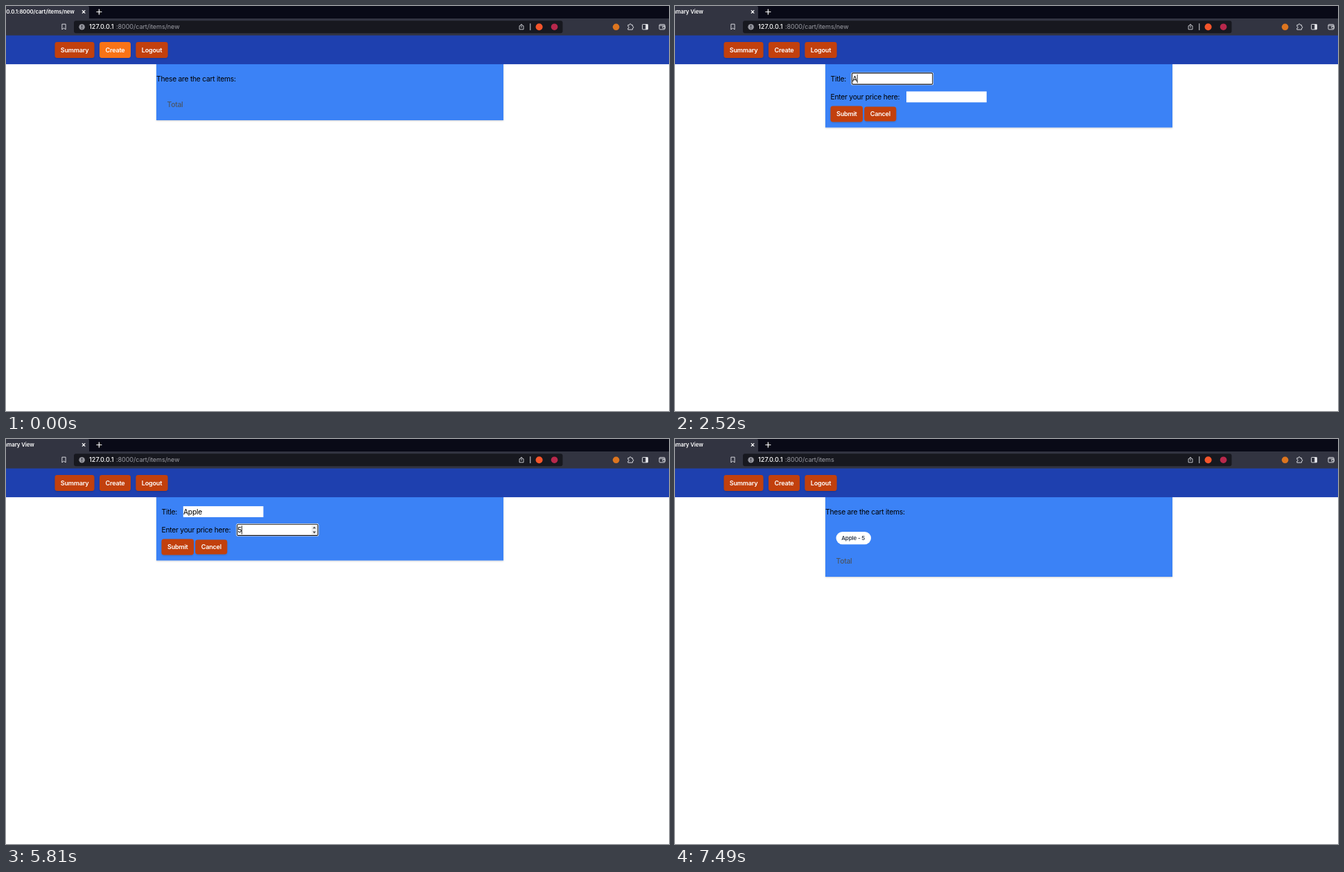
Write an HTML page that moves like this. It is 957 px wide and 585 px high and loops after 8000 ms.

```html
<!DOCTYPE html>
<html lang="en">
<head>
<meta charset="utf-8">
<title>Cart demo</title>
<style>
  html, body { margin: 0; width: 100%; height: 100%; overflow: hidden; background: #fff; }
  svg { display: block; width: 957px; height: 585px; }
  text { font-family: Inter, Roboto, sans-serif; white-space: pre; }
  .body { font-size: 10.3px; letter-spacing: -.025em; }
  .btn { font-size: 9.1px; font-weight: 600; letter-spacing: -.025em; fill: #fff; text-anchor: middle; }
  .tab { font-size: 7.8px; font-weight: 600; letter-spacing: -.01em; fill: #fff; }
  .url { font-size: 9.1px; letter-spacing: -.01em; fill: #9b9ca4; }
  .host { font-weight: 500; letter-spacing: 0; fill: #fff; }
  .muted { fill: #4b5563; font-weight: 500; }
  .pill { font-size: 8.1px; font-weight: 600; letter-spacing: -.025em; fill: #374151; }
  .line { fill: none; stroke: #d5d6dc; stroke-width: 1; }
</style>
</head>
<body>
<svg id="stage" viewBox="0 0 957 585" xmlns="http://www.w3.org/2000/svg">
  <defs>
    <filter id="soft" x="-5%" y="-20%" width="110%" height="150%">
      <feDropShadow dx="0" dy="1" stdDeviation="1" flood-color="#000" flood-opacity=".18"/>
    </filter>
  </defs>
  <rect width="957" height="585" fill="#fff"/>
  <rect id="panel" x="217" y="80" width="501" fill="#3b82f6" filter="url(#soft)"/>

  <!-- browser chrome -->
  <rect width="957" height="19" fill="#090a17"/>
  <path d="M0 0H118Q120 0 120 2V18H957V43H0Z" fill="#323441"/>
  <text id="tab" class="tab" y="11.2"></text>
  <path class="line" d="M109.9 6.2l4.4 4.4m0-4.4l-4.4 4.4M130.4 8.5h8m-4-4v8" style="stroke:#fff;stroke-width:1.2"/>
  <rect x="98" y="21.3" width="705.5" height="17.9" rx="3" fill="#17181f"/>
  <path class="line" d="M80.9 26.2h5.2v7.8l-2.6-2.1l-2.6 2.1z"/>
  <circle cx="109.6" cy="30.2" r="4.3" fill="#92939b"/>
  <path d="M109.6 27.7v3m0 1v1.1" stroke="#17181f" stroke-width="1"/>
  <text class="url host" x="120" y="33.3">127.0.0.1</text>
  <text id="path" class="url" x="159" y="33.3"></text>
  <path class="line" d="M742.6 28.6h-1.5v5.2h5.9v-5.2h-1.5M744 31.5v-5.2m-1.7 1.6l1.7-1.7l1.7 1.7" style="stroke-width:.9"/>
  <path d="M756.8 25.2v9.8" stroke="#d5d6dc"/>
  <circle cx="769.6" cy="30.2" r="5" fill="#f4552b"/>
  <circle cx="791.6" cy="30.2" r="4.8" fill="#b8284c"/>
  <circle cx="880.6" cy="30.3" r="4.8" fill="#dd751f"/>
  <path class="line" d="M897.8 27.4h2q0-1.6 1.3-1.6t1.3 1.6h2v2.1q1.4 0 1.4 1.3t-1.4 1.3v2h-6.6v-2q1.4 0 1.4-1.3t-1.4-1.3z"/>
  <rect class="line" x="918.5" y="26.5" width="8" height="7.4" rx=".7"/>
  <path d="M923.2 26.5h3.3v7.4h-3.3z" fill="#e5e6ea"/>
  <rect class="line" x="943" y="26.7" width="8" height="7.2" rx="1"/>
  <path class="line" d="M943 28.3h8m.4 1.2h-3.6v2.6h3.6z" style="stroke-width:.9"/>

  <rect y="42.5" width="957" height="41.6" fill="#1e40af"/>
  <g id="nav"></g>

  <g id="list">
    <text class="body" x="217" y="108.9">These are the cart items:</text>
    <g id="item">
      <rect x="232.5" y="134" width="50.5" height="18.2" rx="9.1" fill="#fff"/>
      <text class="pill" x="240.2" y="146">Apple - 5</text>
    </g>
    <text id="total" class="body muted" x="232.6">Total</text>
  </g>

  <g id="form">
    <text class="body" x="224.6" y="108.9">Title:</text>
    <text class="body" x="224.6" y="135.2">Enter your price here:</text>
    <g id="fields"></g>
    <g id="spin">
      <rect x="441" y="125" width="8" height="13" fill="#eeeeef"/>
      <path d="M442.7 129.3h4.6l-2.3-2.8zM442.7 133.6h4.6l-2.3 2.8z" fill="#4a4a4a"/>
    </g>
    <g id="actions"></g>
  </g>
</svg>
<script>
const LOOP = 8000;
const $ = id => document.getElementById(id);

function add(parent, tag, attrs, label = '') {
  const el = document.createElementNS('http://www.w3.org/2000/svg', tag);
  for (const key in attrs) el.setAttribute(key, attrs[key]);
  el.textContent = label;
  return parent.appendChild(el);
}

function button(parent, label, x, y, width, height) {
  const box = add(parent, 'rect', { x, y, width, height, rx: 3.4, filter: 'url(#soft)' });
  add(parent, 'text', { class: 'btn', x: x + width / 2, y: y + height / 2 + 3.3 }, label);
  return on => box.setAttribute('fill', on ? '#f97316' : '#c2410c');
}

function field(x, y, width, height) {
  const g = $('fields');
  const glow = add(g, 'rect', { x: x - 1.6, y: y - 1.4, width: width + 3.2, height: height + 2.8, rx: 2.6, fill: '#fff' });
  add(g, 'rect', { x, y, width, height, fill: '#fff' });
  const ring = add(g, 'rect', { x: x - .3, y: y - .2, width: width + .6, height: height + .4, rx: 1.4,
    fill: 'none', stroke: '#10131a', 'stroke-width': 1.1 });
  const text = add(g, 'text', { class: 'body', x: x + .2, y: y + 11.8 });
  const caret = add(g, 'rect', { y: y + 1.8, width: .8, height: 12.4, fill: '#000' });
  return (value, focus, blink) => {
    text.textContent = value;
    show(glow, focus);
    show(ring, focus);
    show(caret, blink);
    if (blink) caret.setAttribute('x', x + .1 + text.getComputedTextLength());
  };
}

const show = (el, on) => el.setAttribute('display', on ? 'inline' : 'none');
const setText = (el, s) => { if (el.textContent !== s) el.textContent = s; };

const navY = [52, 23];
const summary = button($('nav'), 'Summary', 70.5, navY[0], 57, navY[1]);
const create = button($('nav'), 'Create', 135, navY[0], 45, navY[1]);
const logout = button($('nav'), 'Logout', 187.4, navY[0], 46.2, navY[1]);
const submit = button($('actions'), 'Submit', 224.5, 144.5, 46.5, 23);
const cancel = button($('actions'), 'Cancel', 273.3, 145.5, 46, 21);
const titleField = field(255.8, 97.1, 115.7, 15.8);
const priceField = field(334, 123.4, 115.8, 15.8);
const keys = [2520, 2940, 3150, 3500, 3710];

function draw(t) {
  const within = (a, b) => t >= a && t < b;
  const form = within(70, 7420);
  const done = t >= 7420;
  const priceFocus = within(4480, 7140);

  const loading = t < 140 || within(7350, 7490);
  const route = t < 7350 ? '/cart/items/new' : '/cart/items';
  const tab = $('tab');
  setText(tab, loading ? '0.0.1:8000' + route : 'Summary View');
  tab.setAttribute('x', loading ? .2 : 40.6);
  tab.setAttribute('text-anchor', loading ? 'start' : 'end');
  setText($('path'), ':8000' + route);

  $('panel').setAttribute('height', (form ? 175.5 : done ? 199 : 165) - 80);
  show($('form'), form);
  show($('list'), !form);
  show($('item'), done);
  $('total').setAttribute('y', done ? 179.7 : 145.7);

  summary(false);
  create(t < 70);
  logout(false);
  cancel(false);
  submit(within(6650, 7420));

  if (form) {
    const typed = keys.filter(k => t >= k).length;
    titleField('Apple'.slice(0, typed), within(1400, 4480), within(2520, 4200));
    priceField(t >= 5810 ? '5' : '', priceFocus, within(5810, 6300) || within(6860, 7140));
    show($('spin'), priceFocus || within(630, 700));
  }
}

const start = performance.now();
function tick() {
  draw((performance.now() - start) % LOOP);
  requestAnimationFrame(tick);
}
tick();
</script>
</body>
</html>
```
